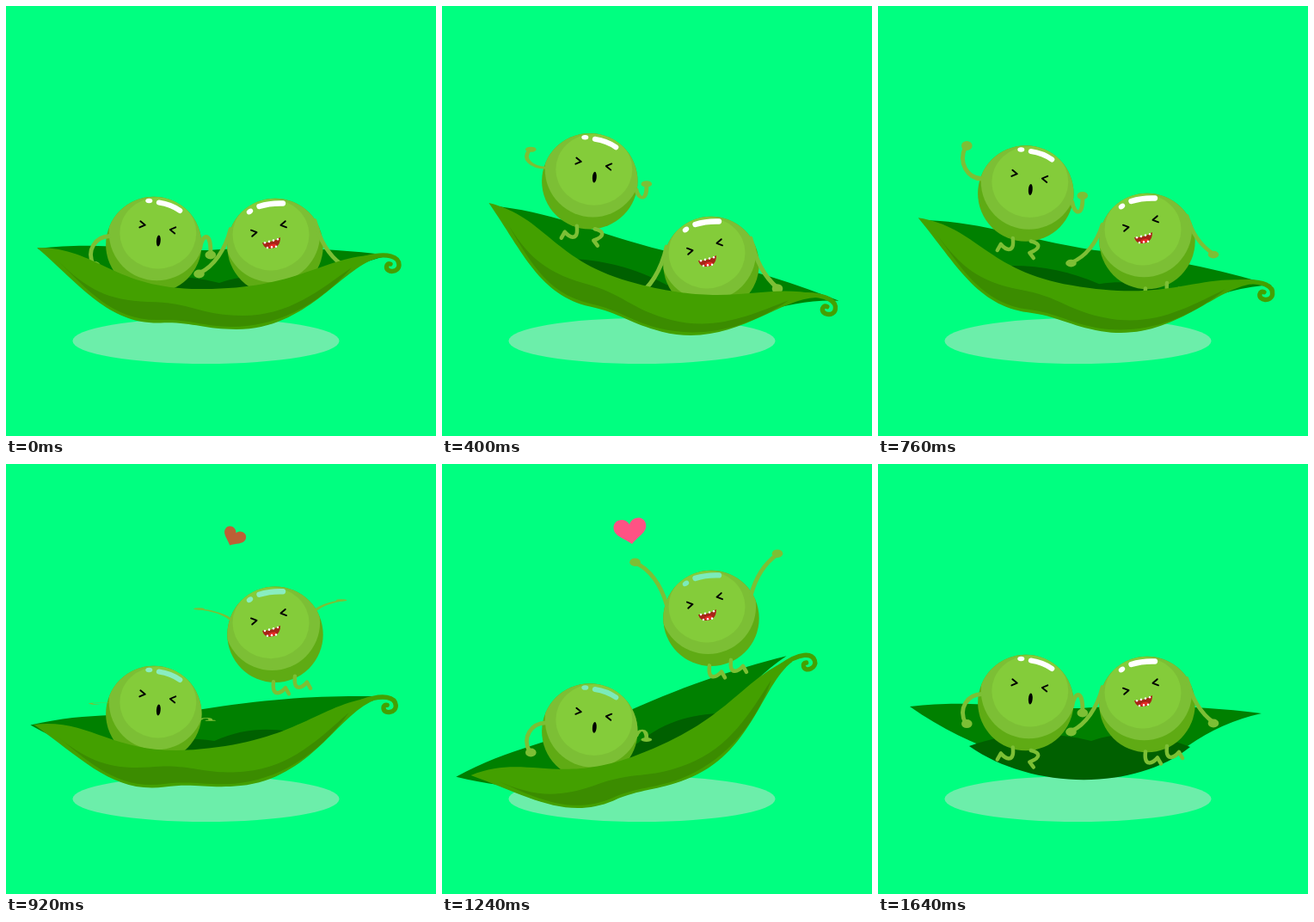
Write an HTML page with a canvas that moves like this. It is 500 by 500 pixels and loops after 1680 ms.

```html
<!DOCTYPE html>
<html lang="en">
<head>
<meta charset="utf-8">
<title>Peas on a seesaw pod</title>
<style>
  html, body { margin: 0; width: 100%; height: 100%; overflow: hidden; background: #00ff80; }
  canvas { display: block; width: 500px; height: 500px; }
</style>
</head>
<body>
<canvas id="stage" width="500" height="500"></canvas>
<script>
const ctx = document.getElementById('stage').getContext('2d');
const LOOP = 1680, STEP = 40, PEA_RADIUS = 55.7;
const COLORS = {
  sky: '#00ff80', shadow: '#6ceeaa',
  back: '#008000', inside: '#006000', front: '#43a000', frontDark: '#3b8c00',
  peaDark: '#5fab14', skin: '#7cbf35', peaLight: '#84cc3a'
};

// Smooth 0..1 ramp between two times.
function ease(t, start, end) {
  const u = Math.max(0, Math.min(1, (t - start) / (end - start)));
  return u * u * (3 - 2 * u);
}

// A value that starts at base and makes eased moves of [amount, start, end].
const moves = (base, ...steps) => t =>
  steps.reduce((sum, [amount, start, end]) => sum + amount * ease(t, start, end), base);

const podAngle = moves(0, [14.4, 0, 240], [-36.2, 640, 1160], [21.8, 1200, 1600]);
const leftY = moves(277.5, [-25, 0, 240], [-107, 240, 580], [145, 600, 920], [21, 920, 1200], [-34, 1220, 1480]);
const rightY = moves(279.5, [18, 0, 240], [6, 240, 560], [-127, 640, 1020], [103, 1200, 1600]);
const leftOuterArm = moves(1, [-2.5, 160, 560], [2.5, 640, 1120]);
const leftInnerArm = moves(1, [-2.5, 120, 560], [2, 600, 1040], [0.5, 1400, 1600]);
const rightArms = moves(1, [0.25, 240, 560], [-2.25, 640, 1100], [2, 1200, 1600]);
const heartX = moves(265, [-46, 920, 1200], [-4, 1240, 1560]);
const heartTilt = moves(27, [-34, 920, 1200], [4, 1240, 1480]);
const heartGrowth = moves(0, [1, 760, 1080], [-1, 1240, 1560]);
const heartAlpha = moves(0, [1, 760, 880], [-1, 1240, 1560]);
const glossTint = moves(0, [0.95, 840, 940], [-0.95, 1240, 1520]);

const mix = (a, b, k) => `rgb(${a.map((v, i) => Math.round(v + (b[i] - v) * k)).join()})`;

function fillPath(color, path) {
  ctx.fillStyle = color;
  ctx.fill(new Path2D(path));
}

function strokePath(color, width, path) {
  ctx.strokeStyle = color;
  ctx.lineWidth = width;
  ctx.stroke(new Path2D(path));
}

function ellipse(color, x, y, rx, ry, tilt = 0) {
  ctx.fillStyle = color;
  ctx.beginPath();
  ctx.ellipse(x, y, rx, ry, tilt, 0, 7);
  ctx.fill();
}

function placed(x, y, degrees, scaleX, scaleY, draw) {
  ctx.save();
  ctx.translate(x, y);
  ctx.rotate(degrees * Math.PI / 180);
  ctx.scale(scaleX, scaleY);
  draw();
  ctx.restore();
}

const turned = (x, y, degrees, draw) =>
  placed(x, y, degrees, 1, 1, () => { ctx.translate(-x, -y); draw(); });

function drawPodBack() {
  fillPath(COLORS.back, `M37 282 C110 273 150 285 235 284 C320 279 380 282 446 290
    Q400 300 360 328 C300 365 165 372 37 282`);
  fillPath(COLORS.inside, `M106 328 C150 312 200 310 248 322 C290 308 325 314 363 329
    C300 380 180 380 106 328`);
}

function drawPodFront() {
  fillPath(COLORS.front, `M36 281 C105 280 125 329 225 329 C340 330 365 292 432 289 L432 293
    C388 306 350 376 268 376 C230 376 215 367 180 368.5 C120 370 90 328 36 281`);
  fillPath(COLORS.frontDark, `M60 296 C95 330 118 342 165 344 C215 344 225 360 275 360
    C330 360 365 330 402 304 C360 352 310 373 262 373 C225 372 215 364 180 365 C125 367 95 330 60 296`);
  strokePath(COLORS.front, 5.4, 'M418 293 C445 286 457 292 457 301 C457 310 442 311 442.5 303 Q443 299 447 300');
}

// Arms swing by being flipped vertically about the shoulder line.
function drawArm(pivotY, flip, path, handX, handY) {
  placed(0, pivotY, 0, 1, flip || 0.02, () => {
    strokePath(COLORS.skin, 4.8, path);
    ellipse(COLORS.skin, handX, handY, 6.3, 5);
  });
}

const drawLeg = (x, y, side) => placed(x, y, 0, side, 1, () =>
  strokePath(COLORS.skin, 4.5, 'M0 0 C-2 18 8 14 14 7 L18 14'));

const drawEye = (x, y, side, tilt) => placed(x, y, tilt, side, 1, () =>
  strokePath('#000', 1.9, 'M-6 -3.6 L0 0 L-6 3.6'));

// side is 1 when the light falls towards the right, -1 towards the left.
function drawBody(side) {
  ellipse(COLORS.peaDark, 0, 0, PEA_RADIUS, PEA_RADIUS);
  ctx.save();
  ctx.beginPath();
  ctx.arc(0, 0, PEA_RADIUS, 0, 7);
  ctx.clip();
  ellipse(COLORS.skin, side * 3.6, -14, PEA_RADIUS, PEA_RADIUS);
  ellipse(COLORS.peaLight, side * 5, -13.5, 44.5, 41.5);
  ctx.restore();
}

function drawLeftPea(t, gloss) {
  drawBody(1);
  drawLeg(-15, 52, -1);
  strokePath(COLORS.skin, 4.5, 'M6 55.5 C17 58 18 64 4.5 69 L9 75');
  drawArm(-13.4, leftOuterArm(t), 'M-51 3.4 C-68 4 -79 20 -70 37', -68.5, 38);
  drawArm(7, leftInnerArm(t), 'M54 -3 C56 -19 67 -24 66 4', 66, 5);
  ellipse(gloss, -5.5, -51, 4, 2.8);
  strokePath(gloss, 6, 'M6 -49 Q20 -47 30.5 -39.5');
  drawEye(-10, -22.8, 1, 8);
  drawEye(19, -17.5, -1, 8);
  ellipse('#000', 5.5, -4.5, 2.4, 6.4, 0.08);
}

function drawRightPea(t, gloss) {
  drawBody(-1);
  drawLeg(-2, 55, 1);
  drawLeg(23, 48.5, 1);
  drawArm(-18, rightArms(t), 'M-52 -2 C-58 22 -72 42 -88 49', -88.5, 50);
  drawArm(-28, rightArms(t), 'M46 -2 C52 22 62 38 77 49', 77, 50);
  ellipse(gloss, -29.5, -40.5, 4, 2.9, -0.6);
  strokePath(gloss, 6.4, 'M-18.5 -46.5 Q-6 -50.5 9 -50');
  drawEye(-21.5, -16.3, 1, -10);
  drawEye(6.5, -24.7, -1, -10);
  fillPath('#a82418', 'M-15 -4.5 Q-4 -4 6 -10.5 Q6 2 -6 2.5 Q-13 3 -15 -4.5');
  ellipse('#e62a28', -3, -0.5, 4.5, 2, -0.25);
  for (let i = 0; i < 4; i++) {
    ellipse('#fff', -12 + 5 * i, -4.3 - 1.3 * i, 1.2, 1.3);
    if (i < 3) ellipse('#fff', -9 + 5 * i, 1.6 - 0.7 * i, 1.2, 1.3);
  }
}

function drawHeart(t) {
  const growth = heartGrowth(t), size = 15 + 23 * growth;
  ctx.globalAlpha = heartAlpha(t);
  placed(heartX(t), 92 - 14 * growth, heartTilt(t), size, size, () =>
    fillPath(mix([188, 96, 54], [255, 82, 132], ease(t, 920, 1160)),
      `M0 0.4 C0.2 0.2 0.5 0.1 0.5 -0.13 C0.5 -0.43 0.1 -0.46 0 -0.2
       C-0.1 -0.46 -0.5 -0.43 -0.5 -0.13 C-0.5 0.1 -0.2 0.2 0 0.4`));
  ctx.globalAlpha = 1;
}

function drawScene(t) {
  const angle = podAngle(t);
  const gloss = mix([255, 255, 255], [116, 234, 182], glossTint(t));
  ctx.fillStyle = COLORS.sky;
  ctx.fillRect(0, 0, 500, 500);
  ellipse(COLORS.shadow, 232.5, 389.5, 155, 26.5);
  turned(245, 378, angle, drawPodBack);
  placed(171.8, leftY(t), 0, 1, 1, () => drawLeftPea(t, gloss));
  placed(313, rightY(t), 0, 1, 1, () => drawRightPea(t, gloss));
  // The front of the pod blinks out on the last step of the loop.
  if (t < LOOP - STEP) turned(251, 328, angle, drawPodFront);
  drawHeart(t);
}

ctx.lineCap = ctx.lineJoin = 'round';
function tick() {
  const t = performance.now() % LOOP;
  drawScene(Math.floor(t / STEP) * STEP);
  requestAnimationFrame(tick);
}
tick();
</script>
</body>
</html>
```
